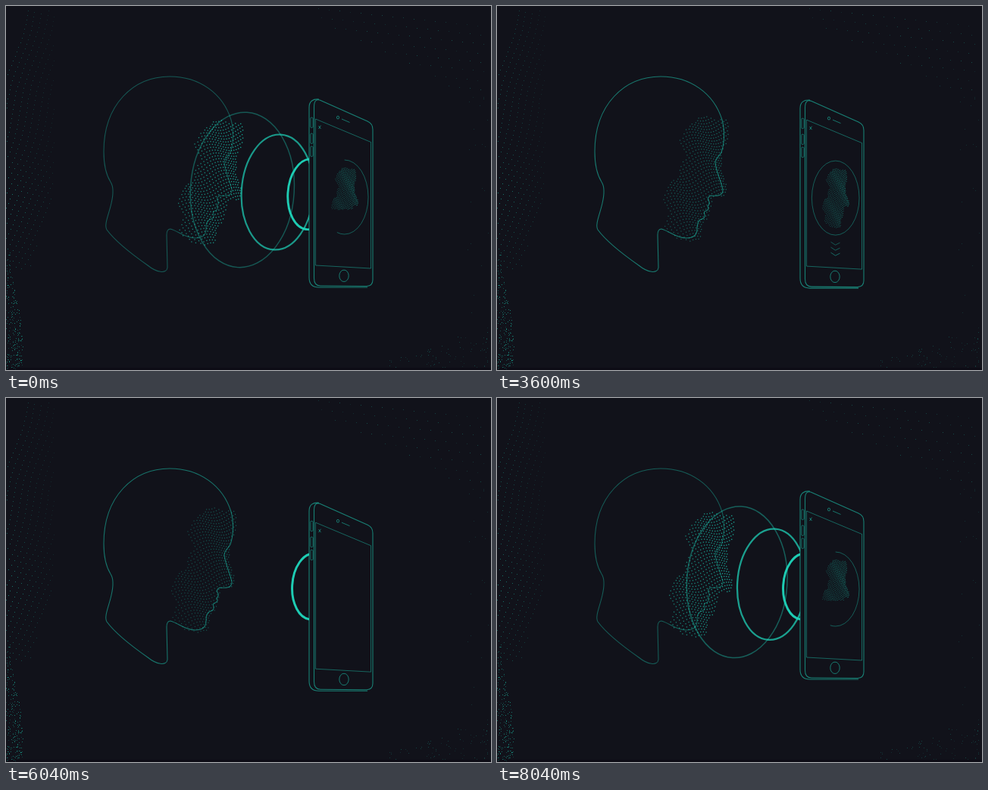
An HTML page with a canvas for the animation above (8080 ms loop, 640x480 px).

```html
<!DOCTYPE html>
<html>
<head>
<meta charset="utf-8">
<style>
html, body { margin: 0; height: 100%; overflow: hidden; background: #11121a; }
canvas { display: block; }
</style>
</head>
<body>
<canvas id="stage" width="640" height="480"></canvas>
<script>
const ctx = document.getElementById('stage').getContext('2d');
const LOOP = 8080, BG = '#11121a', TEAL = '#1fd6bc';
const clamp = (v, a = 0, b = 1) => Math.min(b, Math.max(a, v));

let seed = 7;
const rand = () => (seed = (seed * 16807) % 2147483647) / 2147483647;

// Eased interpolation through [time, value] pairs
function track(t, keys) {
  if (t <= keys[0][0]) return keys[0][1];
  for (let i = 1; i < keys.length; i++) {
    const [t0, a] = keys[i - 1], [t1, b] = keys[i];
    if (t < t1) return a + (b - a) * (1 - Math.cos(Math.PI * (t - t0) / (t1 - t0))) / 2;
  }
  return keys[keys.length - 1][1];
}

function stroke(path, alpha, width = 1) {
  ctx.globalAlpha = alpha;
  ctx.lineWidth = width;
  ctx.stroke(path);
}

function oval(x, y, rx, ry, alpha, width = 1, tilt = 0, from = 0, to = 7) {
  const p = new Path2D();
  p.ellipse(x, y, rx, ry, tilt, from, Math.min(to, from + 2 * Math.PI));
  stroke(p, alpha, width);
}

const head = new Path2D(`M213 345L212 302Q212 294 217 294C228 297 236 306 250 306
  C261 306 264 301 264 294C264 288 265 284 268 282C273 280 275 279 274 275
  Q272 271 276 270Q281 268 278 264Q281 261 280 258Q276 253 282 250
  C291 251 298 250 298 243C297 234 288 216 288 206C289 200 293 199 296 193
  C300 182 301 165 297 150C286 115 255 93 216 93C168 93 129 130 129 192
  C129 210 133 224 138 232C142 238 142 247 139 260C136 274 129 288 133 295
  C144 310 167 328 187 342C198 351 212 354 213 345Z`);

const faceShape = new Path2D(`M283 149L296 154L314 154L314 176L306 198L303 222L311 243L309 254
  L295 258L290 264L293 269L286 277L288 284L278 294L276 311L261 318L244 312L226 298L232 278
  L225 262L237 236L246 232L250 208L256 204L247 180L262 161L276 150Z`);

// Wavy rows clipped to the face, tighter towards the profile: [x, y, brightness]
const faceDots = [];
for (let j = -6; j < 52; j++) {
  for (let i = 0; i < 26; i++) {
    const u = (i + (j & 1) * 0.35) / 26;
    const x = 223 + 94 * (1.25 * u - 0.25 * u * u);
    const y0 = 146 + 4.2 * j;
    const y = y0 - (x - 265) * 0.2 + 5 * Math.sin(x * 0.1 - y0 * 0.05);
    if (ctx.isPointInPath(faceShape, x, y)) faceDots.push([x, y, 0.75 + 0.35 * u]);
  }
}

const backDots = [];
const speck = (x, y, a, size = 1) => backDots.push([Math.round(x), Math.round(y), a, size]);
// Left wave
for (let k = 0; k < 17; k++) {
  for (let y = 6; y < 345; y += 6) {
    const yy = y + (k % 3) * 2;
    const x = k * 9 - 4 + (yy < 205 ? (120 - yy) * 0.28 : -24 - (yy - 205) * 0.55)
      + 3 * Math.sin(yy / 22);
    if (x < 0 || x > 64 - Math.max(0, yy - 240) * 0.3) continue;
    const fold = Math.exp(-(((yy - 250) / 45) ** 2));
    speck(x, yy, (0.36 + 0.2 * fold) * (1 - x / 85));
  }
}
// Lower left swarm
for (let i = 0; i < 230; i++) {
  const y = 325 + 153 * rand() ** 0.6;
  speck(rand() * (5 + 17 * clamp((y - 345) / 75)), y, 0.2 + 0.35 * rand());
}
// Sparse corners on the right
for (let j = 0; j < 15; j++) {
  for (let i = 0; i < 17; i++) {
    const x = 412 + i * 14 + (j % 3) * 4, y = 3 + j * 12 + i * 1.5;
    if (x < 636 && y < 20 + (x - 412) * 0.5) speck(x, y, 0.1 + 0.2 * rand());
  }
}
for (let i = 0; i < 75; i++) {
  const x = 636 - 136 * rand() ** 1.4;
  speck(x, 476 - rand() * (8 + (x - 500) * 0.35), 0.1 + 0.16 * rand());
}
for (let i = 0; i < 18; i++) speck(606 + 30 * rand(), 120 + 300 * rand(), 0.15);

const phoneBack = new Path2D(`M413 123Q400 122 400 134V358Q400 371 413 371H477`);
const phoneFront = new Path2D(`M414 124L477 152Q484 155 484 163V361Q484 369 476 369.5
  L415 369Q406.5 369 406.5 359V133Q406.5 122 414 124Z`);
const screenEdge = new Path2D('M408.5 149L481.5 179.5V346L408.5 342Z');
const details = new Path2D('M443 149L453.5 153.5M412.5 158L415.5 162M415.5 157.5L412.5 162');
const buttons = new Path2D();
for (const y of [147, 168, 185]) buttons.roundRect(401.8, y, 3.2, 13.5, 1.5);

function drawBackground() {
  ctx.globalAlpha = 1;
  ctx.fillStyle = BG;
  ctx.fillRect(0, 0, 640, 480);
  ctx.fillStyle = '#0d0c15';
  ctx.fillRect(0, 477, 640, 3);
  ctx.fillStyle = TEAL;
  for (const [x, y, a, size] of backDots) {
    ctx.globalAlpha = a;
    ctx.fillRect(x, y, size, size);
  }
}

function drawHead(t) {
  stroke(head, track(t, [[1300, 0.36], [3600, 0.52], [4800, 0.56], [5600, 0.56], [6760, 0.38]]), 1.1);
  const shift = track(t, [[2450, 0], [3600, -7.5], [4400, -10], [5600, -9.5], [6760, -8], [7500, 0]]);
  const alpha = track(t, [[2450, 0.72], [3600, 0.46], [4960, 0.34], [5600, 0.34], [6760, 0.42], [7500, 0.72]]);
  const size = 1.1 + 0.3 * alpha;
  for (const [x, y, glow] of faceDots) {
    ctx.globalAlpha = alpha * glow;
    ctx.fillRect(x + shift - 0.5, y + shift * 0.65 - 0.5, size, size);
  }
}

function drawRings(time) {
  ctx.save();
  ctx.beginPath();
  ctx.rect(0, 0, 400, 480);
  ctx.clip();
  for (let k = -1; k <= 5; k++) {
    const age = k + time / 400;
    const s = 28 + 58 * age + 3.1 * age * age;
    if (s < 0 || s > 208) continue;
    const rx = 19.5 + 0.3125 * s, ry = 31 + 0.57 * s - 0.00073 * s * s;
    oval(400 - s + rx, 249.5 - 0.045 * s, rx, ry,
      clamp(1.14 - s / 200, 0, 0.95), 3.2 - 0.011 * s, 0.06);
  }
  ctx.restore();
}

function drawScan(t, time) {
  const scanning = t > 6400;
  const visible = scanning ? 1 : 1 - clamp((t - 4700) / 600);
  const sweep = clamp((time + 1430) * 0.000385);
  const pulse = track(t, [[1400, 0], [1800, 1], [5000, 1], [5400, 0]])
    * (0.5 + 0.5 * Math.cos((t - 2240) / 907 * 2 * Math.PI));
  if (visible && sweep) {
    oval(446.7, 252, 31.3 + 1.5 * pulse, 49 + 2.3 * pulse, 0.38 * visible, 1, 0,
      -Math.PI / 2, -Math.PI / 2 + sweep * 2 * Math.PI);
  }
  const edge = scanning || t < 1200 ? 222 + (time + 1320) * 0.0348 : 400;
  for (const [x, y, glow] of faceDots) {
    const my = 212 + (y - 149) * 0.475;
    ctx.globalAlpha = 0.46 * visible * glow;
    if (my < edge) ctx.fillRect(428 + (x - 225) * 0.43 + (y - 255) * 0.055, my, 0.9, 0.9);
  }
  const hint = track(t, [[1300, 0], [1700, 1], [3800, 1], [4300, 0]]);
  for (let i = 0; i < 3; i++) {
    const y = 311 + i * 7;
    const glow = 0.45 + 0.1 * Math.cos((t - 2240) / 453 * Math.PI - i * 0.8);
    stroke(new Path2D(`M440.5 ${y - 1}L446.5 ${y + 3}L452.5 ${y}`), hint * glow);
  }
}

function drawPhone(t, time) {
  ctx.save();
  ctx.translate(0, track(t, [[3330, 0], [5450, 28], [6700, 0]]));
  ctx.globalAlpha = 1;
  ctx.fillStyle = BG;
  ctx.fill(phoneFront);
  ctx.fillStyle = TEAL;
  stroke(phoneBack, 0.56, 1.1);
  stroke(phoneFront, 0.56, 1.1);
  stroke(screenEdge, 0.42);
  stroke(details, 0.5);
  stroke(buttons, 0.45);
  oval(438, 147, 1.6, 1.9, 0.5);
  oval(446, 355.8, 6.2, 7.7, 0.52);
  drawScan(t, time);
  ctx.restore();
}

function frame(now) {
  const t = now % LOOP;
  // Scan clock: zero at the loop point, negative while the scan leads up to it
  const time = t > 5600 ? t - LOOP : t - 40 * clamp(t / 400);
  ctx.strokeStyle = TEAL;
  drawBackground();
  drawHead(t);
  drawRings(time);
  drawPhone(t, time);
}

const start = performance.now();
(function tick() {
  frame(performance.now() - start);
  requestAnimationFrame(tick);
})();
</script>
</body>
</html>
```
